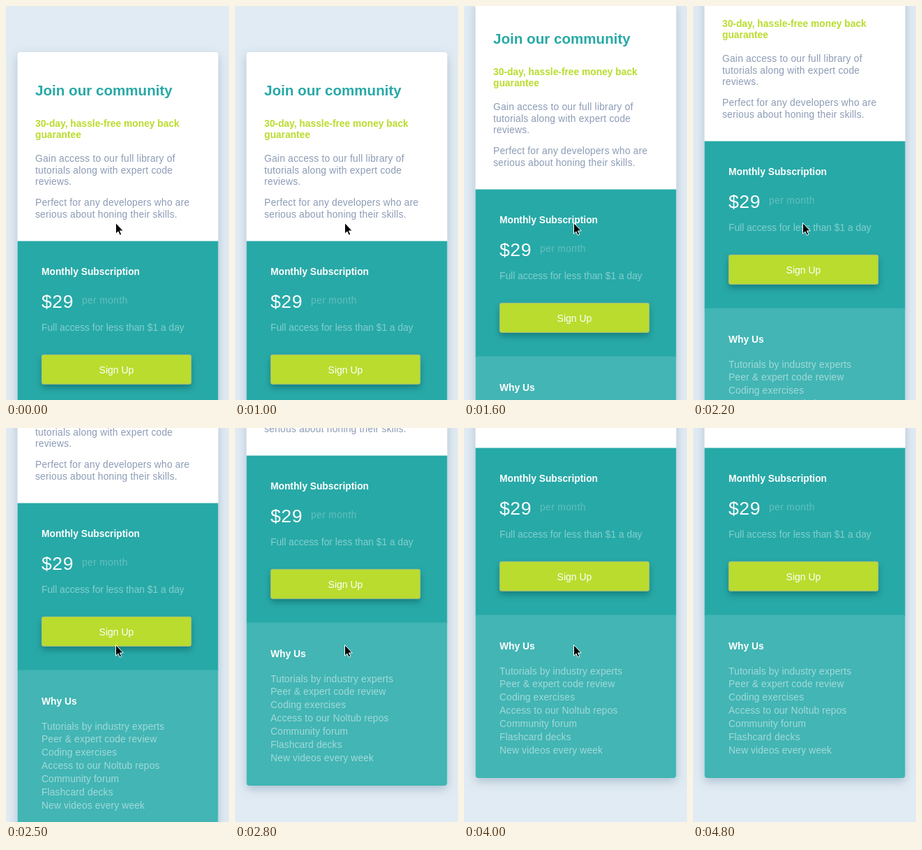
These frames come from a looping animation (320 px wide and 564 px high, 5000 ms). An HTML page:

```html
<!DOCTYPE html>
<html lang="en">
<head>
<meta charset="utf-8">
<title>Pricing card</title>
<style>
  html, body { margin: 0; width: 100%; height: 100%; overflow: hidden; background: #e1ebf3; }
  svg { display: block; width: 100%; height: 100%; }
  text { font: 13.8px "Liberation Sans", Arial, sans-serif; letter-spacing: .15px; fill: #fff; }
  .title { font-size: 20.6px; font-weight: 700; letter-spacing: 0; fill: #28a9a7; }
  .promise { font-weight: 700; letter-spacing: 0; fill: #b9dc2e; }
  .body { letter-spacing: .22px; fill: #8b9bb5; }
  .label { font-weight: 700; letter-spacing: 0; }
  .price { font-size: 26.5px; letter-spacing: .6px; }
  .period { letter-spacing: .4px; fill: #63c0be; }
  .note { letter-spacing: 0; fill: #83cfcd; }
  .item { fill: #a2dad9; }
  .button { font-size: 14px; letter-spacing: 0; text-anchor: middle; }
</style>
</head>
<body>
<svg viewBox="0 0 320 564">
  <defs>
    <clipPath id="cardShape"><rect x="16.5" y="66" width="288" height="743" rx="4"/></clipPath>
    <filter id="cardShadow" filterUnits="userSpaceOnUse" x="-30" y="20" width="380" height="850">
      <feDropShadow dx="0" dy="5" stdDeviation="7" flood-color="#5f7f9f" flood-opacity=".4"/>
    </filter>
    <filter id="buttonShadow" filterUnits="userSpaceOnUse" x="20" y="470" width="280" height="110">
      <feDropShadow dx="0" dy="5" stdDeviation="5" flood-color="#0a4a50" flood-opacity=".45"/>
    </filter>
  </defs>
  <rect width="320" height="564" fill="#e1ebf3"/>
  <g id="page">
    <rect x="16.5" y="66" width="288" height="743" rx="4" fill="#fff" filter="url(#cardShadow)"/>
    <g clip-path="url(#cardShape)">
      <rect x="16" y="336.5" width="289" height="240" fill="#27a9a7"/>
      <rect x="16" y="575.5" width="289" height="234" fill="#42b5b4"/>
    </g>
    <rect x="51" y="499" width="215" height="42.5" rx="3" fill="#b9dc2e" filter="url(#buttonShadow)"/>
    <rect x="51.25" y="499.25" width="214.5" height="42" rx="3" fill="none" stroke="#a5b795" stroke-width=".8"/>
    <g id="copy"></g>
  </g>
  <path id="cursor" d="M0 0V15.6L3.5 12.4L5.8 17.6L8.3 16.5L6 11.4H10.8Z"
        stroke="#fff" stroke-width="1" stroke-linejoin="round"/>
</svg>
<script>
const LOOP = 5000, STEP = 100;
const page = document.getElementById('page');
const copy = document.getElementById('copy');
const cursor = document.getElementById('cursor');

function write(style, x, y, lines, leading = 0) {
  lines.forEach((line, i) => {
    const text = document.createElementNS('http://www.w3.org/2000/svg', 'text');
    text.setAttribute('class', style);
    text.setAttribute('x', x);
    text.setAttribute('y', y + i * leading);
    text.textContent = line;
    copy.append(text);
  });
}

write('title', 42, 128, ['Join our community']);
write('promise', 42, 172.7, ['30-day, hassle-free money back', 'guarantee'], 16.5);
write('body', 42, 223, ['Gain access to our full library of', 'tutorials along with expert code', 'reviews.'], 16.5);
write('body', 42, 286, ['Perfect for any developers who are', 'serious about honing their skills.'], 16.5);
write('label', 51, 385.3, ['Monthly Subscription']);
write('price', 51, 432, ['$29']);
write('period', 109, 426, ['per month']);
write('note', 51, 465, ['Full access for less than $1 a day']);
write('button', 158.5, 525.5, ['Sign Up']);
write('label', 51, 624.8, ['Why Us']);
write('item', 51, 660.5, ['Tutorials by industry experts', 'Peer & expert code review', 'Coding exercises',
  'Access to our Noltub repos', 'Community forum', 'Flashcard decks', 'New videos every week'], 18.85);

// Keys are [time, value]; slopes are limited so the curve never overshoots a key.
function track(keys) {
  const secant = i => (keys[i + 1][1] - keys[i][1]) / (keys[i + 1][0] - keys[i][0]);
  const slope = i => {
    if (i === 0 || i === keys.length - 1) return 0;
    const a = secant(i - 1), b = secant(i);
    return a * b > 0 ? 2 * a * b / (a + b) : 0;
  };
  return t => {
    if (t <= keys[0][0]) return keys[0][1];
    const i = keys.findIndex(key => key[0] >= t) - 1;
    if (i < 0) return keys[keys.length - 1][1];
    const [t0, v0] = keys[i], [t1, v1] = keys[i + 1];
    const d = t1 - t0, u = (t - t0) / d, w = 1 - u;
    return w * w * ((1 + 2 * u) * v0 + u * d * slope(i))
         + u * u * ((3 - 2 * u) * v1 - w * d * slope(i + 1));
  };
}

const scroll = track([[1000, 0], [1200, 9], [1400, 40], [1600, 74], [1800, 101], [2000, 118],
  [2200, 143], [2500, 229], [2700, 284], [3000, 311], [3300, 309], [3600, 308]]);
const cursorX = track([[4300, 157.5], [4500, 177], [4800, 199]]);
const cursorY = track([[4300, 310.5], [4400, 318], [4600, 150], [4800, -25]]);

function render(time) {
  const t = Math.floor(time % LOOP / STEP) * STEP;
  page.setAttribute('transform', `translate(0 ${-Math.round(scroll(t))})`);
  cursor.setAttribute('transform', `translate(${cursorX(t)} ${cursorY(t)})`);
}

const start = performance.now();
function tick() {
  render(performance.now() - start);
  requestAnimationFrame(tick);
}
tick();
</script>
</body>
</html>
```
